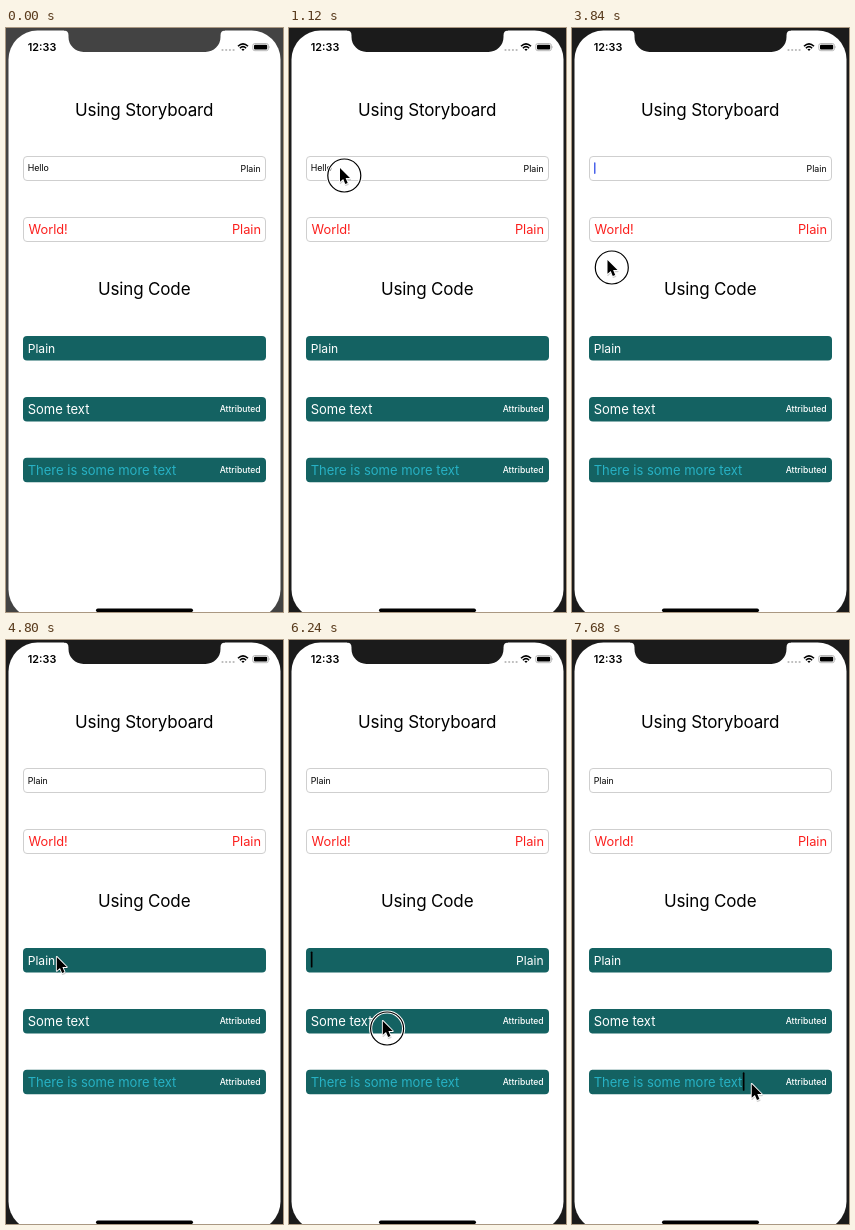
Animation of 277x584 px, one loop 8000 ms. Source, as an HTML page:

```html
<!DOCTYPE html>
<html lang="en">
<head>
<meta charset="utf-8">
<title>Text fields with sliding placeholders</title>
<style>
  html, body { margin: 0; width: 100%; height: 100%; overflow: hidden; background: #fff; }
  svg { display: block; width: 277px; height: 584px; font-family: Inter, "Open Sans", sans-serif; }
  text { white-space: pre; }
  .title { font-size: 17px; letter-spacing: -.15px; text-anchor: middle; }
  .small { font-size: 8.8px; }
  .red { font-size: 12.8px; fill: #fb1f1d; }
  .mid { font-size: 12.1px; fill: #fff; }
  .big { font-size: 13px; fill: #fff; }
  .attr { font-size: 8.6px; font-weight: 500; fill: #fff; }
  .end { text-anchor: end; }
  .light { fill: #fff; stroke: #cfcfcf; }
  .dark { fill: #146262; }
</style>
</head>
<body>
<svg viewBox="0 0 277 584">
  <rect id="bezel" width="277" height="584"/>
  <rect x="2.5" y="2.5" width="272" height="588" rx="29" fill="#fff"/>
  <path id="notch" d="M58 0V2.5Q62.5 2.5 62.5 7.5V9A15 15 0 0 0 77.500 24H199.500A15 15 0 0 0 214.500 9V7.5Q214.500 2.500 219 2.500V0Z"/>

  <text x="21.800" y="23" font-size="10.8" font-weight="600">12:33</text>
  <g fill="#b9b9b9">
    <circle cx="216.500" cy="22" r="1.100"/><circle cx="220.200" cy="22" r="1.100"/>
    <circle cx="223.900" cy="22" r="1.100"/><circle cx="227.600" cy="22" r="1.100"/>
  </g>
  <g fill="none" stroke="#000" stroke-width="1.600">
    <path d="M232 18.300Q237 13.400 242 18.300"/>
    <path d="M233.900 20.200Q237 17.200 240.100 20.200"/>
  </g>
  <path d="M235.400 21.300Q237 20 238.600 21.300L237 23Z"/>
  <rect x="246.800" y="15.500" width="15.600" height="7.200" rx="2" fill="none" stroke="#a5a5a5" stroke-width=".8"/>
  <rect x="248" y="16.700" width="13.200" height="4.800" rx="1"/>
  <path d="M263.300 17.800Q264.600 19.100 263.300 20.400Z" fill="#a5a5a5"/>

  <text class="title" x="138.200" y="88">Using Storyboard</text>
  <rect class="light" x="17.500" y="128.500" width="242" height="24" rx="3.500"/>
  <text class="small" id="typed" x="21.700" y="143.300"></text>
  <text class="small" id="labelA" y="143.800">Plain</text>
  <rect class="light" x="17.500" y="189.500" width="242" height="24" rx="3.500"/>
  <text class="red" x="22.500" y="206">World!</text>
  <text class="red end" x="255" y="206">Plain</text>

  <text class="title" x="138.200" y="267">Using Code</text>
  <rect class="dark" x="17" y="308" width="243" height="24.500" rx="4"/>
  <text class="mid" id="labelB" y="325">Plain</text>
  <rect class="dark" x="17" y="369" width="243" height="24.500" rx="4"/>
  <text class="big" x="21.700" y="386">Some text</text>
  <text class="attr end" x="254.600" y="384">Attributed</text>
  <rect class="dark" x="17" y="429.700" width="243" height="24.500" rx="4"/>
  <text class="big" x="21.700" y="446.800" style="fill:#27b1c4">There is some more text</text>
  <text class="attr end" x="254.600" y="444.700">Attributed</text>

  <rect id="caret"/>
  <rect x="90" y="580.500" width="97" height="3.600" rx="1.800"/>

  <g id="pointer">
    <g id="ring" fill="none">
      <circle cx="4.300" cy="7.500" r="16.500" stroke="#fff" stroke-width="3.200"/>
      <circle cx="4.300" cy="7.500" r="16.500" stroke="#000" stroke-width="1.200"/>
    </g>
    <g stroke-linejoin="round">
      <path id="shade" d="M0 0V13.800L3.200 10.900L5.300 15.900L7.700 14.900L5.600 10.100H10Z" transform="translate(.4 1.400)" fill="#000" stroke="#000" stroke-width="1.400" opacity=".18"/>
      <path d="M0 0V13.800L3.200 10.900L5.300 15.900L7.700 14.900L5.600 10.100H10Z" stroke="#fff" stroke-width="1.800" paint-order="stroke"/>
    </g>
  </g>
</svg>
<script>
const LOOP = 8000, STEP = 160, LEFT = 21.7, RIGHT = 254.6, SLIDE = 300;
const $ = id => document.getElementById(id);
const set = (el, attrs) => { for (const k in attrs) el.setAttribute(k, attrs[k]); };
const show = (el, on) => { el.style.display = on ? '' : 'none'; };
const ease = p => { p = Math.min(1, Math.max(0, p)); return p * p * (3 - 2 * p); };
const within = (t, [a, b]) => t >= a && t < b;
const latest = (table, t) => table.filter(row => row[0] <= t).pop();

// time, x, y of the pointer tip
const path = [
  [320, 277, 56], [960, 51, 140], [2880, 51, 140], [3040, 59.5, 150],
  [3760, 35.5, 232], [4000, 35.5, 232], [4800, 50.8, 317], [5120, 50.8, 317],
  [6200, 93.8, 381], [6320, 93.8, 381], [7360, 179.7, 444], [8000, 179.7, 444]
];
const presses = [[960, 1280], [3840, 4000], [4960, 5120], [6240, 6400], [7520, 7680]];
const typing = [[0, 'Hello'], [1760, 'Hell'], [2240, 'Hel'], [2400, 'H'], [2560, '']];
// time, x, y, width, height, colour of the caret
const carets = [
  [1280, 22, 134.2, 1.5, 11.8, '#4a63ea'],
  [4000, 0, 0, 0, 0, 'none'],
  [5120, 21.8, 311.5, 1.7, 16, '#000'],
  [6400, 84, 371.5, 1.7, 18.5, '#000'],
  [7680, 170.8, 432.3, 1.7, 18.5, '#000']
];

function pointerAt(t) {
  const i = Math.max(1, path.findIndex(p => p[0] >= t));
  const a = path[i - 1], b = path[i];
  const p = ease((t - a[0]) / (b[0] - a[0]));
  return [a[1] + (b[1] - a[1]) * p, a[2] + (b[2] - a[2]) * p];
}

function placeLabel(el, side) {
  const far = RIGHT - el.getComputedTextLength();
  set(el, { x: LEFT + (far - LEFT) * side });
}

function draw(t) {
  const shell = t < 960 ? '#434343' : '#1b1b1b';
  set($('bezel'), { fill: shell });
  set($('notch'), { fill: shell });

  const typed = $('typed'), word = latest(typing, t)[1];
  if (typed.textContent !== word) typed.textContent = word;

  placeLabel($('labelA'), 1 - ease((t - 3920) / SLIDE));
  placeLabel($('labelB'), ease((t - 5040) / SLIDE) - ease((t - 6320) / SLIDE));

  const caret = latest(carets, t);
  show($('caret'), caret);
  if (caret) {
    const [, x, y, width, height, fill] = caret;
    const shift = t < 4000 && word ? typed.getComputedTextLength() - .6 : 0;
    set($('caret'), { x: x + shift, y, width, height, fill, rx: width / 2 });
  }

  show($('pointer'), t >= 480);
  show($('ring'), presses.some(p => within(t, p)));
  const [px, py] = pointerAt(t);
  set($('pointer'), { transform: `translate(${px} ${py})` });
}

const start = performance.now();
function tick() {
  const t = (performance.now() - start) % LOOP;
  draw(Math.floor(t / STEP) * STEP);
  requestAnimationFrame(tick);
}
tick();
</script>
</body>
</html>
```
